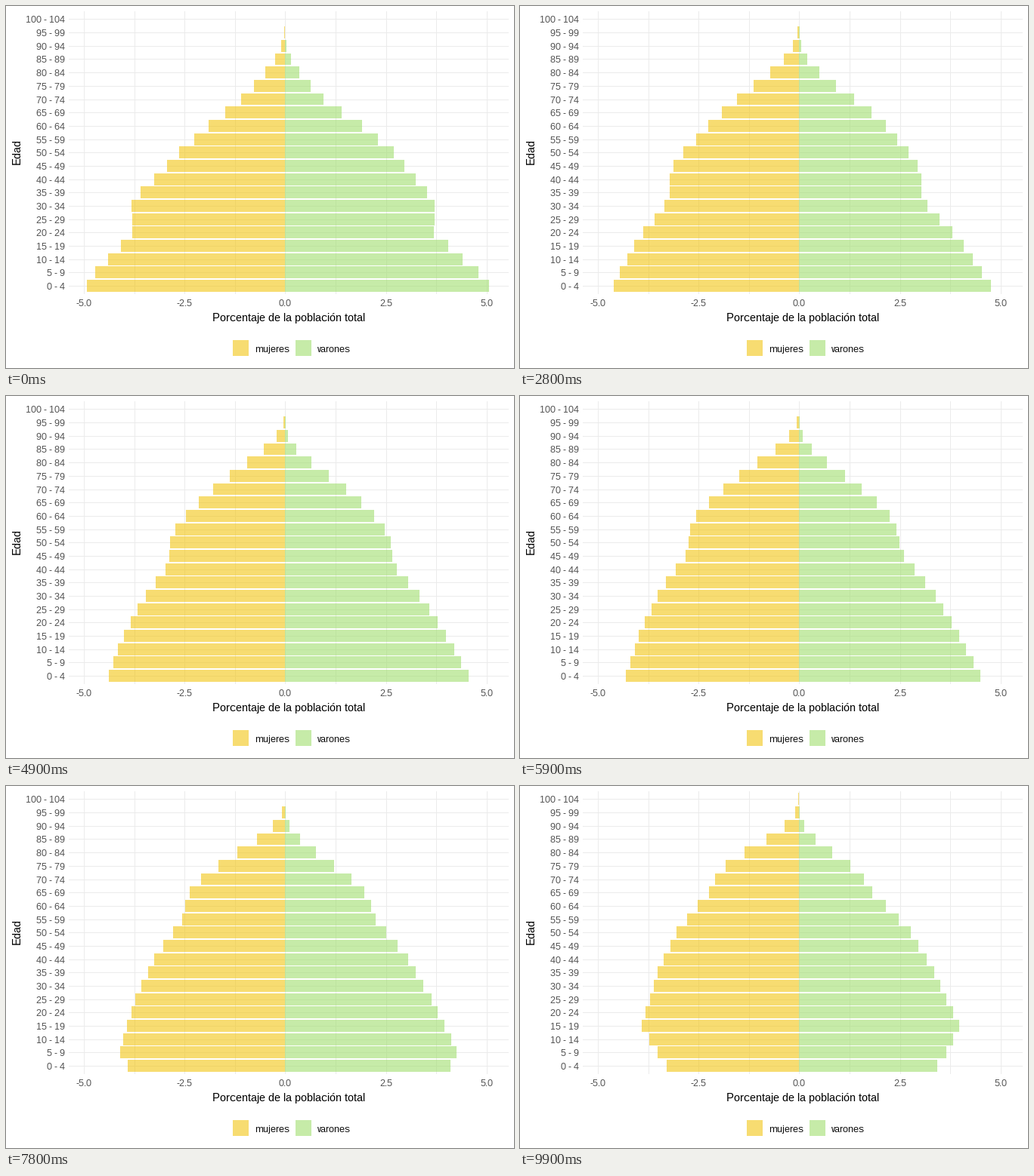
Animation, 672 px wide and 480 px high, one loop 10 s. Source, as a matplotlib script:

```python
import math

import matplotlib.pyplot as plt
import numpy as np
from matplotlib.animation import FuncAnimation
from matplotlib.patches import Rectangle

plt.rcParams.update({
    "font.family": "Liberation Sans",
    "text.hinting": "native",
    "text.hinting_factor": 1,
})

W, H, DPI = 672, 480, 96
FRAMES, STEP, KEYS, AGES = 100, 11, 10, 21
LEFT, RIGHT, TOP, BOTTOM = 83, 665, 7, 382
ZERO, UNIT = 369.45, 53.3
SEAM = math.floor(ZERO)
BASE, ROW = 371.61, 17.685
YELLOW, GREEN, ALPHA = "#f3c612", "#a0de6e", 0.6
GRID, GREY = "#ebebeb", "#4d4d4d"

# Size at birth of the cohorts, by five-year period of birth
BORN = [-19, -14, -12, -10, -8, -6.4, -4, -1, 2, 6, 9]
WOMEN = [38, 133, 187, 228, 253, 274, 243, 263, 260, 239, 175]
MEN = [60, 158, 226, 264, 276, 286, 248, 271, 268, 252, 183]


def pyramid(births, shrink, risk, ageing):
    """Bar length in pixels for every key year and age group."""
    t = np.arange(KEYS)[:, None]
    age = np.arange(AGES)
    survival = np.exp(-shrink * age - risk * np.exp(ageing * age))
    period = 1 - 0.06 * np.sin(np.pi * t / (KEYS - 1))
    return np.interp(t - age, BORN, births) * survival * period


def lengths(keys, i):
    k = min(i // STEP, KEYS - 2)
    w = i / STEP - k
    return np.rint((1 - w) * keys[k] + w * keys[k + 1] + 0.12)


fig = plt.figure(figsize=(W / DPI, H / DPI), dpi=DPI, facecolor="white")
ax = fig.add_axes([0, 0, 1, 1])
ax.set_xlim(0, W)
ax.set_ylim(H, 0)
ax.axis("off")


def box(x, y, w, h, color, alpha=1, z=1):
    return ax.add_patch(Rectangle((x, y), w, h, fc=color, ec="none", lw=0,
                                  alpha=alpha, zorder=z, antialiased=False))


def label(x, y, s, px=12, color="black", ha="left", va="baseline", **kw):
    ax.text(x, y, s, fontsize=px * 72 / DPI, color=color, ha=ha, va=va, **kw)


# Grid and axis labels
for n in range(-4, 5):
    x = ZERO + 1.25 * n * UNIT
    box(round(x), TOP, 1, BOTTOM - TOP, GRID)
    if n % 2 == 0:
        label(x - 0.2, 398, f"{1.25 * n:.1f}", color=GREY, ha="center")

centers = [BASE - ROW * a for a in range(AGES)]
for a, y in enumerate(centers):
    box(LEFT, math.floor(y), RIGHT - LEFT, 1, GRID)
    label(78, math.floor(y) + 5, f"{5 * a} - {5 * a + 4}", color=GREY, ha="right")

label(374, 418, "Porcentaje de la población total", px=15, ha="center")
label(22, 193, "Edad", px=15, ha="right", va="center", rotation=90)

# Legend
for x, color, name in ((300, YELLOW, "mujeres"), (383, GREEN, "varones")):
    box(x, 443, 21, 21, color, ALPHA)
    label(x + 29, 459, name)

# Bars
women = pyramid(WOMEN, 0.0467, 7.6e-5, 0.557)
men = pyramid(MEN, 0.0567, 2.3e-4, 0.52)
bars = []
for y in centers:
    top, end = math.floor(y - 0.45 * ROW), math.floor(y + 0.45 * ROW)
    bars.append([box(SEAM, top, 0, end - top, color, ALPHA, 2)
                 for color in (YELLOW, GREEN)])


def update(i):
    for (left, right), f, m in zip(bars, lengths(women, i), lengths(men, i)):
        left.set_x(SEAM - f)
        left.set_width(f)
        right.set_width(m)
    return [b for pair in bars for b in pair]


anim = FuncAnimation(fig, update, frames=FRAMES, init_func=lambda: update(0),
                     interval=100, repeat=True, repeat_delay=0, blit=False)
plt.show()
```
